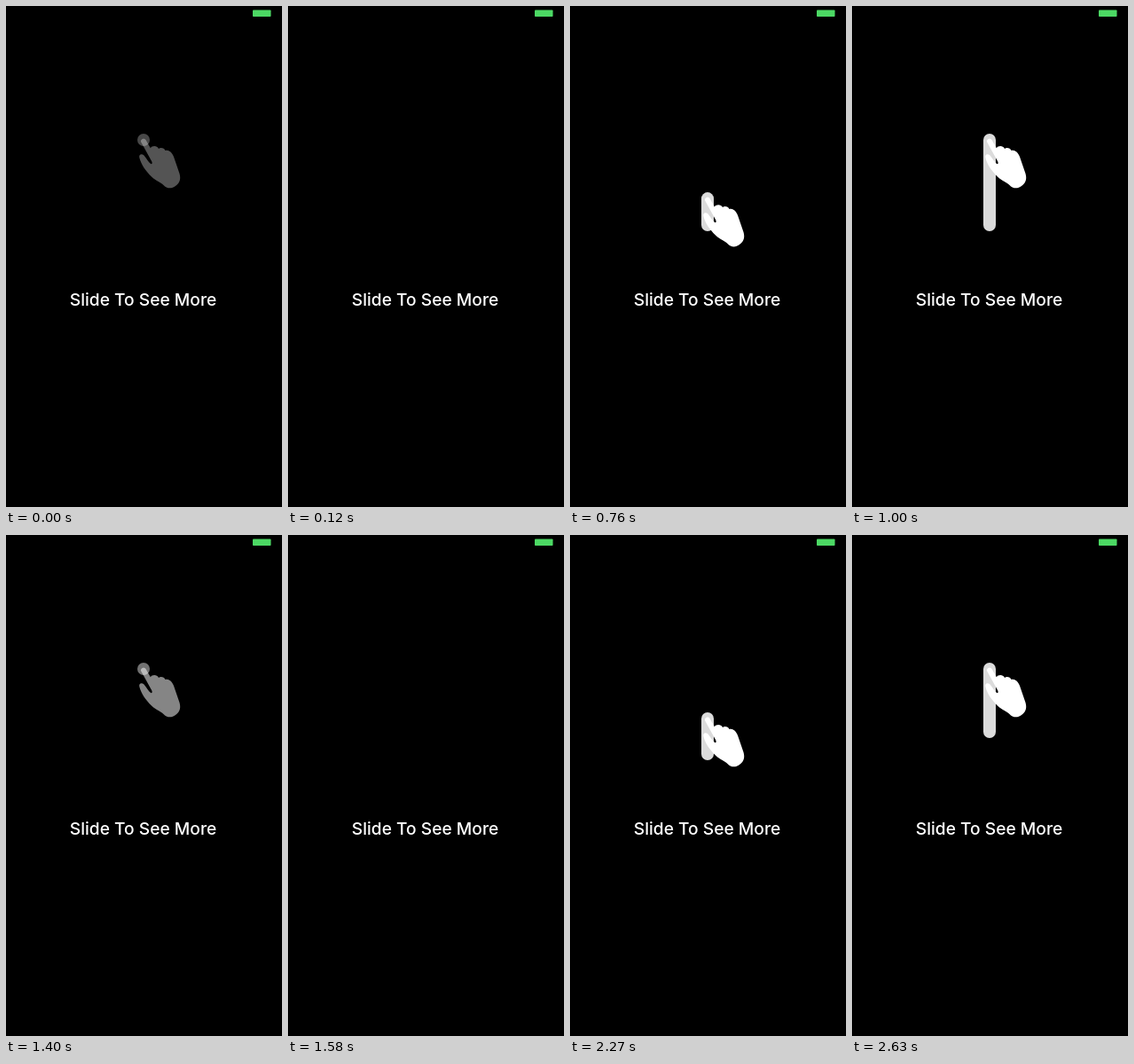
An HTML page with a canvas for the animation above (2730 ms loop, 311 by 565 pixels).

```html
<!DOCTYPE html>
<html lang="en">
<head>
<meta charset="utf-8">
<title>Slide To See More</title>
<style>
  html, body { margin: 0; width: 100%; height: 100%; overflow: hidden; background: #000; }
  canvas { display: block; width: 311px; height: 565px; }
</style>
</head>
<body>
<canvas id="stage" width="311" height="565"></canvas>
<script>
const ctx = document.getElementById('stage').getContext('2d');
const LOOP = 2730;
const TOP = 151, TRAVEL = 96;   // fingertip centre at the end of the swipe, swipe length

// Spans of motion: start, end, number of evenly spaced steps. The picture rests in between.
const SPANS = [[0, 120, 3], [530, 1000, 9], [1110, 1580, 9], [2000, 2440, 9], [2560, 2630, 2]];

const hand = new Path2D(`
  M152.2 153.5 C150.8 150.5 155.5 148 157.5 151 L162.8 160.3
  C164.5 157.5 170 157 172 161 C174.5 158.8 178.5 160.5 179.5 163
  C184 161.5 187.5 166 189 170 L195.5 189
  C197 194.5 196.5 199 191 203 C186.5 206.5 181 206 177.5 202
  C174 198.5 169 197.5 164 192.5 C157 185.5 152.5 179 150.3 171
  C149.5 167 153 166.3 155.5 168.5 C158.5 172 160.5 176.5 163.5 178.2
  C165.5 178 164.5 175.5 163.5 174 Z`);

const progress = (t, start, length) => Math.min(1, Math.max(0, (t - start) / length));
const easeIn = p => Math.pow(p, 1.86);

function stepTime(t) {
  const [start, end, count] = SPANS.filter(span => span[0] <= t).pop();
  const step = (end - start) / (count - 1);
  const index = Math.min(count - 1, Math.floor((t - start) / step + 0.1));
  return start + index * step;
}

// Time since the current swipe began; the loop opens near the end of one.
function swipeTime(t) {
  if (t < 530) return t + 931;
  return t < 2000 ? t - 530 : t - 2000;
}

function drawSwipe(t) {
  const alpha = 1 - progress(t, 730, 300);
  if (alpha <= 0) return;
  const tip = TOP + TRAVEL * (1 - easeIn(progress(t, 0, 440)));
  const tail = TOP + TRAVEL * (1 - easeIn(progress(t, 545, 175)));

  ctx.globalAlpha = alpha;
  ctx.fillStyle = 'rgba(255, 255, 255, 0.86)';
  ctx.beginPath();
  ctx.roundRect(148, tip - 7, 14, tail - tip + 14, 7);
  ctx.fill();

  ctx.save();
  ctx.translate(0, tip - TOP);
  ctx.fillStyle = '#fff';
  ctx.fill(hand);
  ctx.restore();
  ctx.globalAlpha = 1;
}

function draw(t) {
  ctx.fillStyle = '#000';
  ctx.fillRect(0, 0, 311, 565);

  ctx.fillStyle = '#4cd964';
  ctx.beginPath();
  ctx.roundRect(278, 4.5, 20.5, 7.5, 0.8);
  ctx.fill();

  ctx.fillStyle = '#fff';
  ctx.font = '500 19.2px Inter, Roboto, sans-serif';
  ctx.textAlign = 'center';
  ctx.fillText('Slide To See More', 154.5, 338);

  drawSwipe(swipeTime(stepTime(t)));
}

const began = performance.now();
function tick() {
  draw((performance.now() - began) % LOOP);
  requestAnimationFrame(tick);
}
tick();
</script>
</body>
</html>
```
